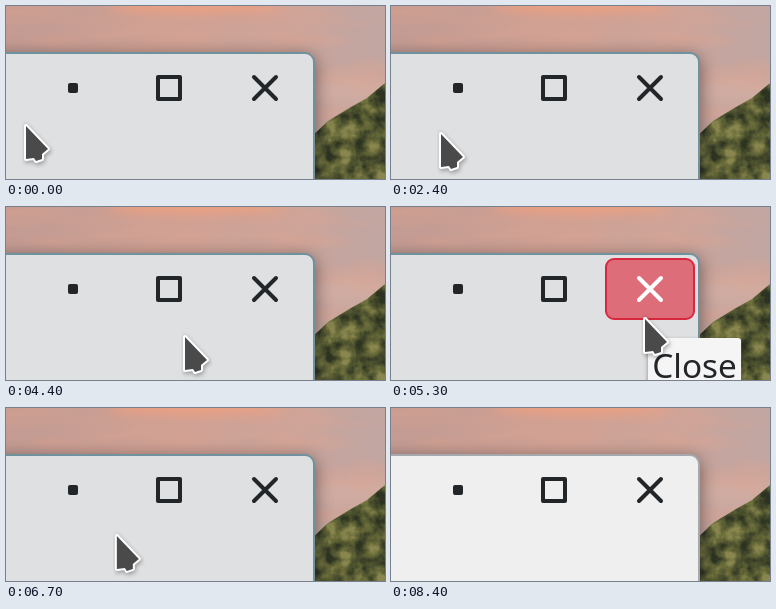
These frames come from a looping animation (379 px wide and 173 px high, 8500 ms). An HTML page:

```html
<!DOCTYPE html>
<html lang="en">
<head>
<meta charset="utf-8">
<title>Window buttons</title>
<style>
  html, body { margin: 0; width: 100%; height: 100%; overflow: hidden; }
  svg { display: block; width: 379px; height: 173px; }
  text { font: 33.3px "Noto Sans", "Open Sans", sans-serif; fill: #232629; }
  filter { color-interpolation-filters: sRGB; }
  .icon { fill: none; stroke: #232629; stroke-width: 4; stroke-linejoin: round; }
</style>
</head>
<body>
<svg viewBox="0 0 379 173">
  <defs>
    <linearGradient id="sky">
      <stop offset="0" stop-color="#c29b93"/>
      <stop offset=".5" stop-color="#d1a295"/>
      <stop offset="1" stop-color="#c1a6a2"/>
    </linearGradient>
    <filter id="soft" x="-50%" y="-100%" width="200%" height="300%"><feGaussianBlur stdDeviation="6"/></filter>
    <filter id="shade" x="-20%" y="-30%" width="140%" height="160%"><feGaussianBlur stdDeviation="9"/></filter>
    <filter id="blur" x="-20%" y="-20%" width="140%" height="150%"><feGaussianBlur stdDeviation="2"/></filter>
    <filter id="streaks" x="0" y="0" width="100%" height="100%">
      <feTurbulence type="fractalNoise" baseFrequency=".012 .05" numOctaves="2" seed="4"/>
      <feColorMatrix values="0 0 0 0 .92  0 0 0 0 .65  0 0 0 0 .55  2 0 0 0 -.8"/>
    </filter>
    <filter id="moss" x="0" y="0" width="100%" height="100%">
      <feTurbulence type="fractalNoise" baseFrequency=".06" numOctaves="4" seed="8"/>
      <feColorMatrix values="2.2 0 0 0 -.6  2.2 0 0 0 -.6  2.2 0 0 0 -.6  0 0 0 0 1"/>
      <feComponentTransfer>
        <feFuncR type="table" tableValues=".18 .29 .4 .54"/>
        <feFuncG type="table" tableValues=".2 .31 .41 .53"/>
        <feFuncB type="table" tableValues=".13 .18 .22 .31"/>
      </feComponentTransfer>
      <feComposite in2="SourceGraphic" operator="in"/>
    </filter>
    <path id="arrow" d="M0 0V33L8 32 10 35 16 33 16 28 22 23Z"/>
  </defs>

  <rect width="379" height="173" fill="url(#sky)"/>
  <g filter="url(#soft)">
    <ellipse cx="190" cy="0" rx="90" ry="7" fill="#ec9f80"/>
    <ellipse cx="345" cy="85" rx="45" ry="14" fill="#cfaba1"/>
  </g>
  <rect width="379" height="173" filter="url(#streaks)" opacity=".35"/>
  <path d="M300 136 322 115 345 101 361 92 379 77V173H300Z" filter="url(#moss)"/>

  <rect x="-30" y="50" width="339" height="160" rx="9" fill="#1d1a1c" opacity=".55" filter="url(#shade)"/>
  <rect id="frame" x="-20" y="47" width="328" height="160" rx="9" stroke-width="2"/>

  <g id="buttons"></g>
  <rect x="62" y="77" width="10" height="10" rx="2" fill="#232629"/>
  <rect class="icon" x="152" y="71" width="22" height="22"/>
  <path class="icon" id="cross" d="M248 71l22 22m0-22-22 22" stroke-linecap="round"/>

  <g id="tips"></g>
  <g id="cursor">
    <use href="#arrow" x="1" y="2" stroke="#000" stroke-width="4" opacity=".3" filter="url(#blur)"/>
    <use href="#arrow" fill="#4a4a4b" stroke="#fff" stroke-width="4" stroke-linejoin="round" paint-order="stroke"/>
  </g>
</svg>
<script>
const LOOP = 8500, STEP = 100, FADE = 150, TIP_DELAY = 400;
const $ = id => document.getElementById(id);

const buttons = [
  { x: 22, fill: '#e7b184', line: '#ee8a50', label: 'Minimise', tip: [53, 112] },
  { x: 118, fill: '#95ccad', line: '#55c183', label: 'Maximise', tip: [167, 128] },
  { x: 214, fill: '#dd6d78', line: '#da2740', label: 'Close', tip: [257, 131] }
];

// pointer moves: start, arrival, x, y
const moves = [
  [-1, 0, 20, 120],
  [400, 850, 55, 102], [1900, 2400, 50, 128],
  [2800, 3100, 169, 104], [3700, 4400, 179, 130],
  [4450, 4800, 254, 112], [5400, 5950, 220, 126],
  [5950, 6200, 149, 107], [6400, 7500, 87, 141],
  [7500, 8100, -30, 190]
];

const clamp = v => Math.max(0, Math.min(1, v));
const easeOut = u => 1 - (1 - u) ** 3;

function pointer(t) {
  return moves.reduce(([px, py], [start, end, x, y]) => {
    const k = easeOut(clamp((t - start) / (end - start)));
    return [px + (x - px) * k, py + (y - py) * k];
  }, [0, 0]);
}

const inside = (b, [x, y]) => x > b.x && x < b.x + 90 && y > 52 && y < 114;

// share of the last FADE ms spent over the button
function glow(b, t) {
  let sum = 0;
  for (let back = 0; back < FADE; back += 10) sum += inside(b, pointer(t - back));
  return sum * 10 / FADE;
}

// a tip appears once the pointer has rested and goes after it sets off
function tipOpacity(b, t) {
  return Math.max(...moves.slice(0, -1).map(([, arrive, ...spot], i) =>
    inside(b, spot) * clamp((t - arrive - TIP_DELAY) / 100) * (1 - clamp((t - moves[i + 1][0] - 100) / 100))));
}

$('buttons').innerHTML = buttons.map(b =>
  `<rect x="${b.x + 1}" y="52" width="88" height="60" rx="8" fill="${b.fill}" stroke="${b.line}" stroke-width="2"/>`).join('');
$('tips').innerHTML = buttons.map(({ label, tip: [x, y] }) =>
  `<g><rect x="${x}" y="${y + 2}" height="53" rx="3" opacity=".4" filter="url(#blur)"/>
  <rect x="${x}" y="${y}" height="53" rx="3" fill="#f5f5f6"/>
  <text x="${x + 4.3}" y="${y + 40}">${label}</text></g>`).join('');
for (const tip of $('tips').children) {
  const width = tip.querySelector('text').getComputedTextLength() + 8.6;
  tip.querySelectorAll('rect').forEach(r => r.setAttribute('width', width));
}

function draw() {
  const t = Math.floor(performance.now() % LOOP / STEP) * STEP;
  const active = t < 8400;
  $('frame').setAttribute('fill', active ? '#dfe0e2' : '#efefef');
  $('frame').setAttribute('stroke', active ? '#70929e' : '#a5a9ad');
  buttons.forEach((b, i) => {
    $('buttons').children[i].setAttribute('opacity', glow(b, t));
    $('tips').children[i].setAttribute('opacity', tipOpacity(b, t));
  });
  $('cross').style.stroke = glow(buttons[2], t) > .5 ? '#fff' : '#232629';
  $('cursor').setAttribute('transform', `translate(${pointer(t)})`);
  requestAnimationFrame(draw);
}
draw();
</script>
</body>
</html>
```
